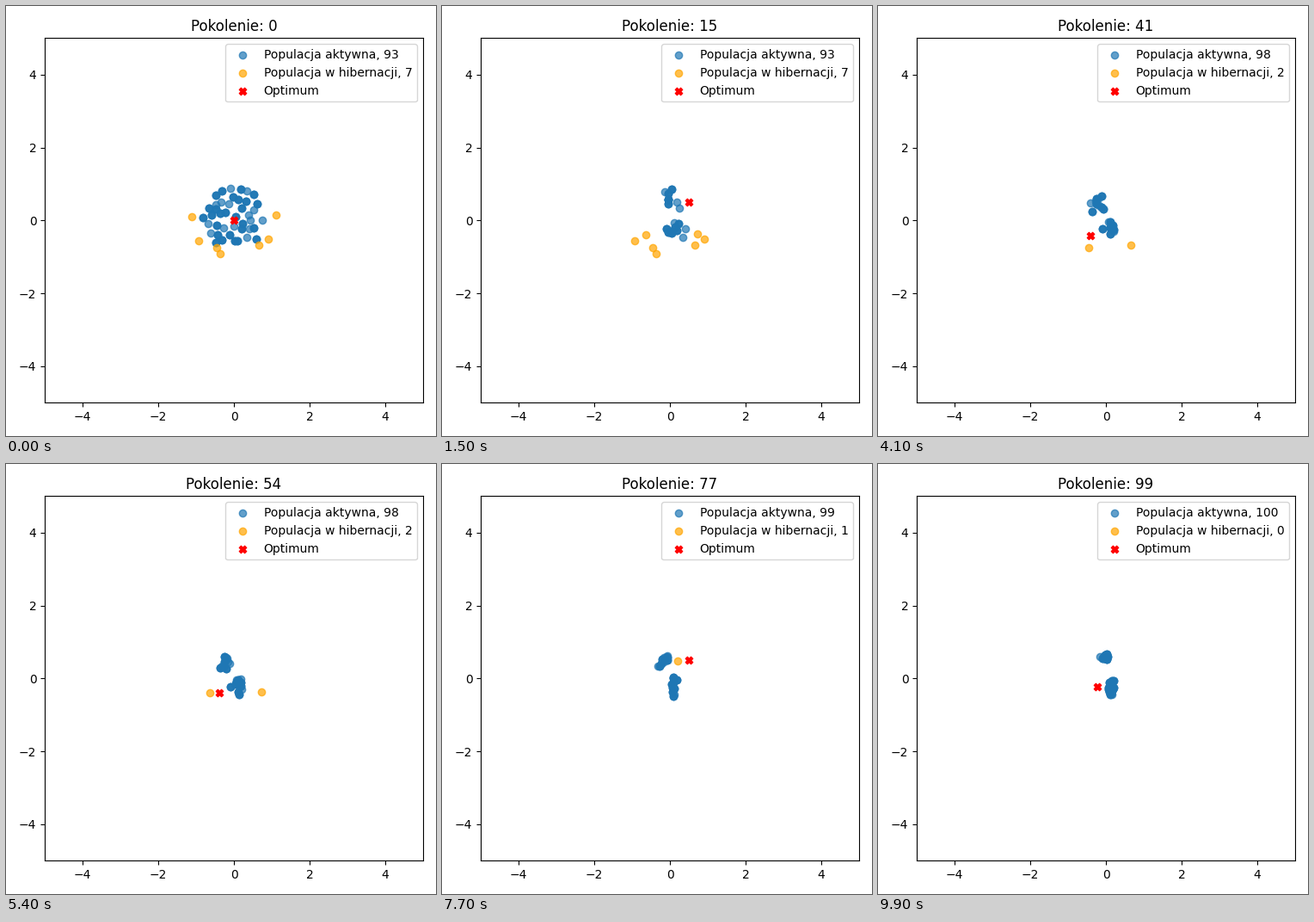
Write a matplotlib script that moves like this. It is 500 px wide and 500 px high and loops after 10000 ms.

```python
import numpy as np
import matplotlib.pyplot as plt
from matplotlib.animation import FuncAnimation

GENERATIONS = 100
POPULATION = 100
FOUNDERS = 42
GOLDEN_ANGLE = np.pi * (3 - 5 ** .5)
REST = 7  # generations between two awakenings

rng = np.random.default_rng(4)

# Drift of the upper niche; the lower one hardly moves.
DRIFT_GEN = [0, 6, 25, 41, 67, 86, 99]
DRIFT_X = [-.1, -.2, 0, -.3, -.15, -.08, .02]
DRIFT_Y = [.5, .6, .6, .36, .48, .6, .6]
SLEEPERS = [7, 9, 5, 2, 2, 1, 0]


def upper_niche(gen):
    center = np.interp(gen, DRIFT_GEN, DRIFT_X), np.interp(gen, DRIFT_GEN, DRIFT_Y)
    return center, .08 + .4 * np.exp(-gen / 30)


def lower_niche(gen):
    size = .1 + .2 * np.exp(-gen / 10), .15 + .002 * gen
    return (.12 - .15 * np.exp(-gen / 10), -.2), size


def in_disc(center, size):
    angle, radius = rng.uniform(0, 2 * np.pi), np.sqrt(rng.random())
    return np.add(center, np.multiply(size, polar(radius, angle)))


def polar(radius, angle):
    return radius * np.array([np.cos(angle), np.sin(angle)])


def spot(point, born, life):
    """A position held by one or three individuals for some generations."""
    return point, rng.choice([1, 3, 3]), born, born + 1 + rng.exponential(life)


def found(k):
    point = polar(.85 * np.sqrt((k + .5) / FOUNDERS), k * GOLDEN_ANGLE)
    return spot(point + (-.02, .12) + rng.normal(0, .05, 2), 0, 6)


def hibernate(j):
    """Sleepers ring the crowd, then close in on a point above the center."""
    radius = 1.13 - .7 * min(1, j / 12) ** 1.5
    swing = (-1) ** j * (1.3 + .32 * j) * np.clip((12 - j) / 8, 0, 1)
    return polar(radius, 1.75 + swing)


spots = [found(k) for k in range(FOUNDERS)]
for gen in range(1, GENERATIONS):
    spots += [spot(in_disc(*niche(gen)), gen, 9)
              for niche in (upper_niche, lower_niche)]
beds = np.array([hibernate(j) for j in range(GENERATIONS // REST + 10)])

fig, ax = plt.subplots(figsize=(5, 5), dpi=100)
ax.set(xlim=(-5, 5), ylim=(-5, 5))
title = ax.set_title("Pokolenie: 0")
active = ax.scatter([], [], alpha=.7, label="Populacja aktywna, 93")
dormant = ax.scatter([], [], color="orange", alpha=.7,
                     label="Populacja w hibernacji, 7")
optimum = ax.scatter([0], [0], color="red", marker="X", label="Optimum")
legend = ax.legend(loc="upper right")
fig.tight_layout()


def update(gen):
    asleep = round(np.interp(gen, DRIFT_GEN, SLEEPERS))
    first = gen // REST
    active.set_offsets([point for point, copies, born, dies in spots
                        if born <= gen < dies for _ in range(copies)])
    dormant.set_offsets(beds[first:first + asleep])
    optimum.set_offsets([[.5 * np.sin(.1 * gen)] * 2])
    title.set_text(f"Pokolenie: {gen}")
    labels = legend.get_texts()
    labels[0].set_text(f"Populacja aktywna, {POPULATION - asleep}")
    labels[1].set_text(f"Populacja w hibernacji, {asleep}")
    return active, dormant, optimum, title


anim = FuncAnimation(fig, update, frames=GENERATIONS, interval=100,
                     repeat=True, repeat_delay=0)
plt.show()
```
